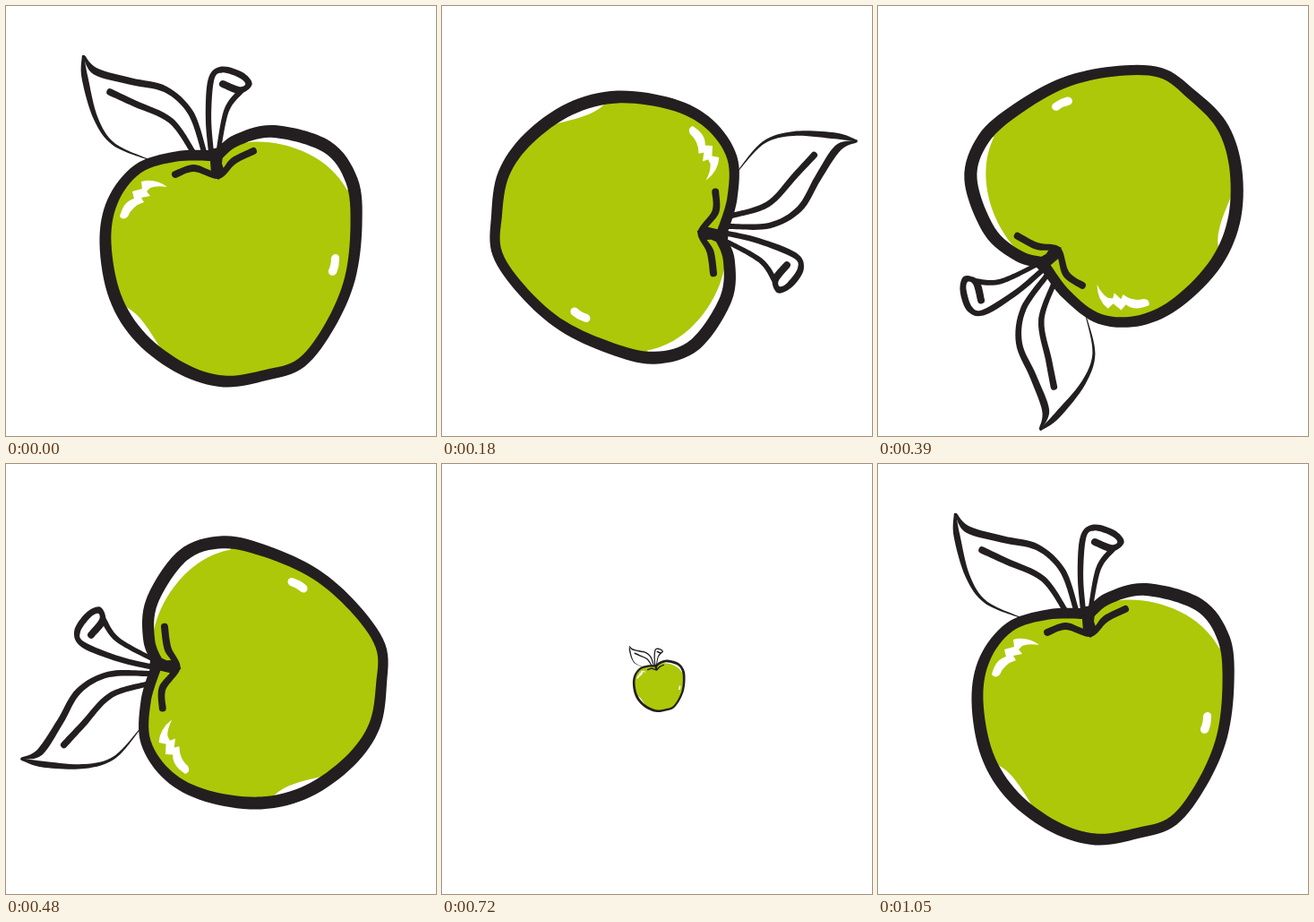
An HTML page for the animation above (1200 ms loop, 480 by 480 pixels).

```html
<!DOCTYPE html>
<html lang="en">
<head>
<meta charset="utf-8">
<title>Apple</title>
<style>
html, body { margin: 0; width: 100%; height: 100%; overflow: hidden; background: #fff; }
svg { display: block; width: 100vw; height: 100vh; }
</style>
</head>
<body>
<svg viewBox="0 0 480 480"><g id="apple"></g></svg>
<script>
const INK = '#231f20', GREEN = '#adc808', WHITE = '#fff';
const STEP = 30, LOOP = 1200, SPIN_END = 600, GONE = 750, BACK = 1050;
const apple = document.getElementById('apple');

const parse = text => text.split(' ').map(pair => pair.split(',').map(Number));
const taper = (from, to) => t => from + (to - from) * t;

function fill(d, color) {
  const path = document.createElementNS('http://www.w3.org/2000/svg', 'path');
  path.setAttribute('d', d);
  path.setAttribute('fill', color);
  apple.append(path);
}

// Smooth curve through the points (Catmull-Rom as cubic Béziers).
function smooth(points) {
  const at = i => points[Math.max(0, Math.min(points.length - 1, i))];
  return points.slice(1).reduce((d, end, i) => {
    const start = points[i], before = at(i - 1), after = at(i + 2);
    const c1 = start.map((v, k) => v + (end[k] - before[k]) / 6);
    const c2 = end.map((v, k) => v - (after[k] - start[k]) / 6);
    return d + `C${c1} ${c2} ${end}`;
  }, 'M' + points[0]);
}

// Round-ended ink stroke; width(t) gives its thickness along the way.
function brush(points, width) {
  const last = points.length - 1;
  const edge = side => points.map(([x, y], i) => {
    const [ax, ay] = points[Math.max(0, i - 1)];
    const [bx, by] = points[Math.min(last, i + 1)];
    const r = side * width(i / last) / 2 / Math.hypot(bx - ax, by - ay);
    return [x - (by - ay) * r, y + (bx - ax) * r];
  });
  const near = edge(1), far = edge(-1).reverse();
  const cap = (t, end) => `A${width(t) / 2} ${width(t) / 2} 0 0 0 ${end}`;
  fill(smooth(near) + cap(1, far[0]) + smooth(far).replace(/^M[^C]+/, '') + cap(0, near[0]) + 'Z', INK);
}
const ink = (text, from, to = from) => brush(parse(text), taper(from, to));

// Body: green, white gaps tucked under the ink, then the outline
const body = parse('233,167 190,168 147,182 119,218 111,265 122,325 151,371 197,405 243,419 290,412 330,398 362,356 384,304 391,245 386,195 358,157 299,140 257,150 236,167');
fill(smooth(body), GREEN);
fill('M262,153C300,146 358,162 381,206L387,195C370,150 310,135 262,147Z', WHITE);
fill('M134,336C150,344 160,362 173,383L160,381C145,366 134,350 128,336Z', WHITE);
brush(body, t => 12.7 + 1.5 * Math.cos(4 * Math.PI * (t - 0.33)));

// Dimple
ink('189,188 210,181 237,189 254,173 276,162', 8);
fill('M227,160L243,157L241,176L245,187L237,194L229,187Z', INK);

// Stem
ink('229,163 226,125 229,82 241,71 262,77 271,87 261,94 242,87', 6, 8);
ink('262,95 246,117 237,163', 6.5, 5);

// Leaf
brush(parse('87,56 100,73 139,84 178,93 206,119 221,162'), t => Math.min(2.5 + 28 * t, 8.5 - 2.5 * t));
brush(parse('86,56 88,80 100,125 120,154 158,171'), t => Math.min(2.5 + 20 * t, 9 - 8 * t));
ink('116,96 144,109 184,128 209,163', 7.5, 6);

// Highlights
fill('M127,235Q131,218 143,215L141,207L152,204L151,196Q166,192 180,202Q168,200 161,203L157,207L161,212L151,214L154,219Q141,223 136,235Q131,240 127,235Z', WHITE);
fill('M363,281C365,275 373,276 372,283Q372,291 369,298C366,303 359,301 360,295Q363,289 363,281Z', WHITE);

function pose(t) {
  if (t < SPIN_END) return `rotate(${360 * t / SPIN_END})`;
  if (t < GONE) return `scale(${(GONE - t) / (GONE - SPIN_END)})`;
  return `scale(${Math.min(1, (t - GONE) / (BACK - GONE))})`;
}

const start = performance.now();
function draw(now) {
  const t = Math.floor(Math.max(0, now - start) % LOOP / STEP) * STEP;
  apple.setAttribute('transform', `translate(240 240) ${pose(t)} translate(-240 -240)`);
  requestAnimationFrame(draw);
}
draw(start);
</script>
</body>
</html>
```
